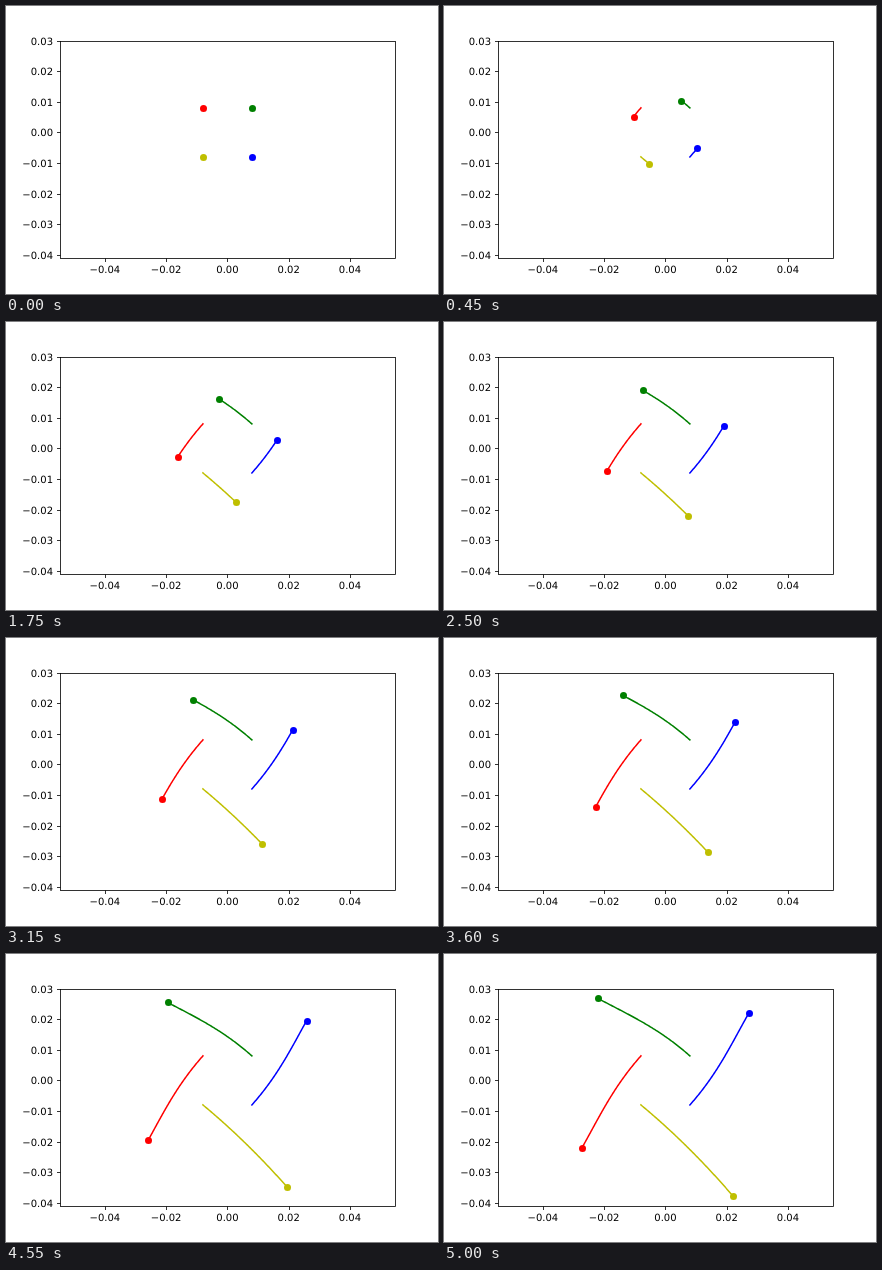
Write an HTML page that moves like this. It is 432 by 288 pixels and loops after 5050 ms.

```html
<!DOCTYPE html>
<html lang="en">
<head>
<meta charset="utf-8">
<title>Four paths</title>
<style>
  html, body { margin: 0; width: 100%; height: 100%; overflow: hidden; background: #fff; }
  svg { display: block; width: 432px; height: 288px; }
  text { font: 10px "DejaVu Sans", sans-serif; text-rendering: geometricPrecision; }
  .axis { fill: none; stroke: #000; stroke-width: .8; }
  .trail { fill: none; stroke-width: 1.5; stroke-linejoin: round; stroke-linecap: square; }
</style>
</head>
<body>
<svg id="plot" viewBox="0 0 432 288"></svg>
<script>
const STEP = 50, COUNT = 101;
const ORIGIN = { x: 221.4, y: 126.43 };
const SCALE = 3062.5;
const plot = document.getElementById('plot');

function add(tag, attrs, text) {
  const node = document.createElementNS('http://www.w3.org/2000/svg', tag);
  for (const key in attrs) node.setAttribute(key, attrs[key]);
  if (text) node.textContent = text;
  return plot.appendChild(node);
}

const snap = v => Math.round(v) + 0.5;
const label = v => (v < 0 ? '\u2212' : '') + Math.abs(v).toFixed(2);

// Distances from the origin in pixels after k steps.
function outward(k) {
  const u = k / 33;
  return 24.5 + 24 * u - 2.85 * u * (u - 1) + 3.8 / 6 * u * (u - 1) * (u - 2);
}
function sideways(k) {
  const s = k / 100;
  return -24.5 + 92.3 * s + 3.4 * s * (1 - s);
}
const upward = k => outward(k) - 1.5 * (k / 100) ** 2;
const downward = k => 24.5 + 0.793 * k + 0.00121 * k * k;

const movers = [
  { color: '#f00', at: k => [-outward(k), sideways(k)] },
  { color: '#008000', at: k => [-sideways(k), -upward(k)] },
  { color: '#00f', at: k => [outward(k), -sideways(k)] },
  { color: '#bfbf00', at: k => [sideways(k), downward(k)] }
].map(({ color, at }) => ({
  points: Array.from({ length: COUNT }, (_, k) => {
    const [dx, dy] = at(k);
    return [ORIGIN.x + dx, ORIGIN.y + dy];
  }),
  trail: add('polyline', { class: 'trail', stroke: color }),
  dot: add('circle', { r: 3.5, fill: color })
}));

function drawAxes() {
  add('rect', { class: 'axis', x: 54.5, y: 35.5, width: 335, height: 217 });
  for (let i = -2; i <= 2; i++) {
    const value = i * 0.02, x = ORIGIN.x + value * SCALE;
    add('path', { class: 'axis', d: `M${snap(x)} 252.5v3.5` });
    add('text', { x, y: 267, 'text-anchor': 'middle' }, label(value));
  }
  for (let i = -4; i <= 3; i++) {
    const value = i * 0.01, y = snap(ORIGIN.y - value * SCALE);
    add('path', { class: 'axis', d: `M54.5 ${y}h-3.5` });
    add('text', { x: 47, y: y + 3.5, 'text-anchor': 'end' }, label(value));
  }
}

function draw(k) {
  for (const { points, trail, dot } of movers) {
    const [x, y] = points[k];
    trail.setAttribute('points', points.slice(0, k + 1).join(' '));
    dot.setAttribute('cx', snap(x));
    dot.setAttribute('cy', snap(y));
  }
}

const start = performance.now();
function tick() {
  const elapsed = Math.max(0, performance.now() - start);
  draw(Math.floor(elapsed / STEP) % COUNT);
  requestAnimationFrame(tick);
}

drawAxes();
tick();
</script>
</body>
</html>
```
